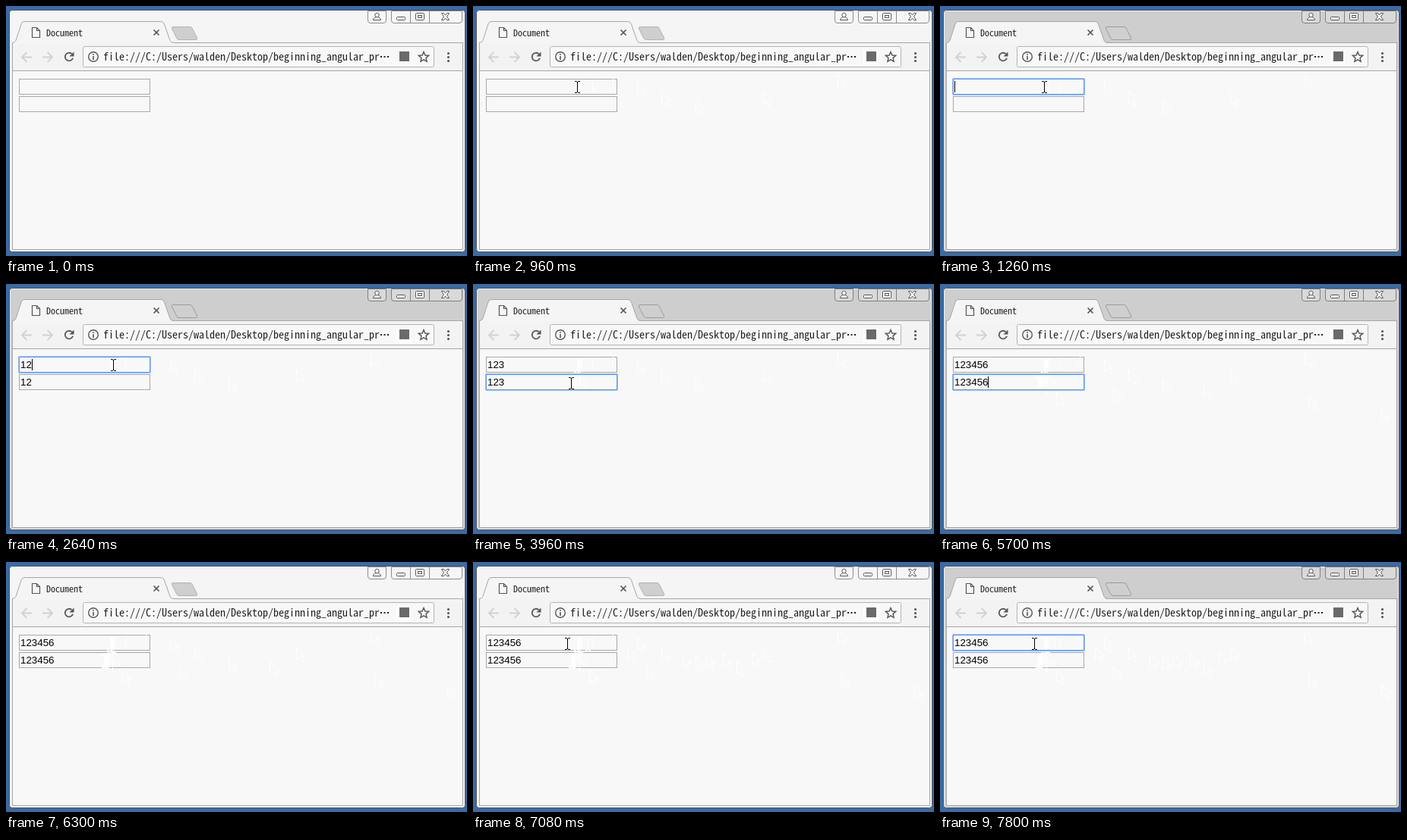
An HTML page for the animation above (8000 ms loop, 607x330 px).

```html
<!DOCTYPE html>
<html lang="en">
<head>
<meta charset="utf-8">
<title>Two-way binding</title>
<style>
  html, body { margin: 0; width: 100%; height: 100%; overflow: hidden; background: #3a6ba4; }
  svg { display: block; }
  .mono {
    font-family: "Noto Sans Mono CJK SC", "Noto Sans Mono CJK JP", "Liberation Mono", monospace;
    font-size-adjust: ch-width .5;
    fill: #222;
  }
  .value { font: 13.333px "Liberation Sans", Arial, sans-serif; fill: #000; }
  .line { fill: none; stroke: #a6a6a6; }
  .icon { fill: none; stroke: #555; }
  .frame { fill: #f5f5f5; stroke: #4b4f55; }
  .button { fill: #f6f6f6; stroke: #8d8d8d; }
  .newtab { fill: #cfcfcf; stroke: #b3b3b3; }
  .active .frame { fill: #cecece; }
  .active .button { fill: #d9d9d9; stroke: #7f7f7f; }
  .active .newtab { stroke: #9c9c9c; }
  .field { fill: #f8f8f8; stroke: #a9a9a9; }
  #focus { fill: none; stroke: #6496ec; }
  #trail { fill: none; stroke: #fff; }
</style>
</head>
<body>
<svg id="stage" width="607" height="330" viewBox="0 0 607 330">
  <defs>
    <path id="arrow" d="M.5.5V17.5L4.5 13.8 7.3 20.2 10 19 7.2 12.8H12.3Z"/>
    <path id="beam" d="M-3 -7.5H-1L.5 -6.5 2 -7.5H4M.5 -7V7M-3 7.5H-1L.5 6.5 2 7.5H4"/>
  </defs>

  <!-- window frame -->
  <rect width="607" height="330" fill="#3a6ba4"/>
  <rect class="frame" x="4.5" y="5.5" width="600" height="319" rx="4"/>
  <rect x="5.5" y="6.5" width="598" height="317" rx="3" fill="none" stroke="#fff" stroke-opacity=".7"/>

  <!-- caption buttons -->
  <path class="button" d="M476.5 6.5V19Q476.5 22.5 480 22.5H497Q500.5 22.5 500.5 19V6.5Z"/>
  <path class="button" d="M507.5 6.5V19Q507.5 22.5 511 22.5H597Q600.5 22.5 600.5 19V6.5ZM532.5 6.5V22.5M557.5 6.5V22.5"/>
  <g fill="#fff" stroke="#555">
    <path d="M483.5 18.5A5 4 0 0 1 493.5 18.5Z"/>
    <circle cx="488.5" cy="12" r="2.7"/>
    <rect x="514.5" y="14.5" width="11" height="4" rx="1"/>
    <rect x="539.5" y="9.5" width="11" height="9" rx="1"/>
    <rect x="542.5" y="12.5" width="5" height="3"/>
    <path d="M573.5 9.5H576.5L578.5 12 580.5 9.5H583.5L580.5 14 583.5 18.5H580.5L578.5 16 576.5 18.5H573.5L576.5 14Z"/>
  </g>

  <!-- tab and toolbar -->
  <rect x="9" y="49" width="592" height="37" fill="#f3f3f3"/>
  <path d="M8 49.5Q12 48.5 13 45.5L20 24Q21 20.5 24 20.5H204Q207 20.5 208.5 24L216 45.5Q217 48.5 221 49.5Z" fill="#f5f5f5"/>
  <path class="line" d="M8.5 48.5Q12 48 13 45.5L20 24Q21 20.5 24 20.5H204Q207 20.5 208.5 24L216 45.5Q217 48.5 221 48.5H601"/>
  <path class="newtab" d="M220 27.5H242Q244.5 27.5 245.5 30L251.5 42Q252.5 44.5 250 44.5H228Q225.5 44.5 224.5 42L218.5 30Q217.5 27.5 220 27.5Z"/>
  <path class="icon" stroke-width="1.2" d="M34.5 28.5H40.5L44.5 32.5V41.5H34.5ZM40.5 28.5V32.5H44.5"/>
  <text class="mono" x="53" y="39.5" font-size="12">Document</text>
  <path class="icon" stroke-width="1.7" d="M194.5 31.5L201.5 38.5M201.5 31.5L194.5 38.5"/>

  <g class="icon" stroke-width="1.8">
    <path stroke="#d2d2d2" d="M34 67.5H21.5M27.5 61L21 67.5 27.5 74M48 67.5H60.5M54.5 61L61 67.5 54.5 74"/>
    <path d="M86.7 63.2A5.3 5.3 0 1 0 88.1 68.8"/>
  </g>
  <path d="M89.5 60.5V66.5H83.5Z" fill="#555"/>

  <rect x="101.5" y="53.5" width="462" height="27" rx="2" fill="#f8f8f8" stroke="#b4b4b4"/>
  <circle class="icon" cx="115" cy="67" r="6.3" stroke-width="1.4"/>
  <path class="icon" stroke-width="1.6" d="M115 66V71M115 63V64.7"/>
  <text class="mono" x="128" y="72" font-size="14">file:///C:/Users/walden/Desktop/beginning_angular_pr</text>
  <path d="M493 66h2v2h-2zM497.5 66h2v2h-2zM502 66h2v2h-2z" fill="#222"/>
  <rect id="hover" x="514" y="58" width="19" height="19" fill="#fff"/>
  <rect x="518" y="60" width="13" height="13" fill="#6a6a6a"/>
  <path class="icon" stroke-width="1.4" d="M550 60.5L551.9 65 556.7 65.4 553 68.6 554.1 73.3 550 70.8 545.9 73.3 547 68.6 543.3 65.4 548.1 65Z"/>
  <path d="M582.5 62.5v0m0 5v0m0 5v0" stroke="#555" stroke-width="3.2" stroke-linecap="round"/>

  <!-- page -->
  <rect x="9" y="86" width="592" height="235" fill="#f8f8f8"/>
  <path class="line" d="M8.5 48V321.5H601.5V48M9 85.5H601"/>
  <rect class="field" x="17.5" y="96.5" width="172" height="20"/>
  <rect class="field" x="17.5" y="119.5" width="172" height="20"/>
  <g id="trail"></g>
  <g id="focus">
    <rect x="16.5" y="95.5" width="174" height="22" rx="1.5" stroke-opacity=".6"/>
    <rect x="17.5" y="96.5" width="172" height="20"/>
  </g>
  <text class="value" x="19" y="111"></text>
  <text class="value" x="19" y="134"></text>
  <rect id="caret" y="99" width="1" height="15"/>
  <use id="pointer"/>
</svg>
<script>
  const LOOP = 8000, TICK = 60, BLINK = 520, DIGIT = 7.415, ROW = 23;
  const $ = id => document.getElementById(id);
  const stage = $("stage"), pointer = $("pointer");
  const values = document.querySelectorAll(".value");

  const keys = [2180, 2600, 2780, 4100, 4280, 4640];
  const clicks = [
    { t: 0, field: -1 }, { t: 1220, field: 0 }, { t: 3440, field: 1 },
    { t: 6260, field: -1 }, { t: 7280, field: 0 }
  ];

  // Pointer visits as key points: time, x, y.
  const visits = [
    [[180, 594, 33], [300, 480, 90], [420, 293, 124], [540, 216, 99], [720, 143, 107],
     [960, 137, 107], [2400, 141, 107], [2820, 141, 107], [2940, 140, 118], [3300, 129, 130],
     [4320, 129, 132], [4680, 134, 133], [4800, 153, 142], [4920, 347, 131], [5040, 581, 162], [5160, 603, 153]],
    [[6660, 574, 51], [6720, 367, 118], [6900, 276, 121], [6960, 204, 112], [7080, 124, 108], [LOOP, 124, 108]]
  ];

  const last = (list, t) => list.filter(e => e.t <= t).pop();
  const show = (el, on) => el.setAttribute("visibility", on ? "visible" : "hidden");

  // Cubic Hermite through b and c, with level ends where the pointer rests.
  function glide(a, b, c, d, t, axis) {
    const slope = (p, q, r) => {
      const before = (q[axis] - p[axis]) / (q[0] - p[0] || 1);
      const after = (r[axis] - q[axis]) / (r[0] - q[0] || 1);
      return before * after > 0 ? 2 * before * after / (before + after) : 0;
    };
    const span = c[0] - b[0], u = (t - b[0]) / span, v = 1 - u;
    return v * v * (1 + 2 * u) * b[axis] + u * u * (1 + 2 * v) * c[axis]
      + span * u * v * (v * slope(a, b, c) - u * slope(b, c, d));
  }

  function locate(t) {
    const visit = visits.find(v => t >= v[0][0] && t < v.at(-1)[0] + TICK);
    if (!visit) return null;
    const end = visit.length - 1;
    const i = Math.min(visit.findLastIndex(p => p[0] <= t), end - 1);
    const around = [visit[Math.max(i - 1, 0)], visit[i], visit[i + 1], visit[Math.min(i + 2, end)]];
    const [x, y] = [1, 2].map(axis => Math.round(glide(...around, t, axis)));
    const overField = x > 17 && x < 190 && y > 96 && y < 140 && y !== 118;
    return { x, y, shape: overField ? "beam" : "arrow" };
  }

  function place(el, { shape, x, y }) {
    el.setAttribute("href", "#" + shape);
    el.setAttribute("transform", `translate(${x} ${y})`);
  }

  // Faint outlines stay on the page where the pointer has been.
  const ghosts = [];
  for (let t = 0; t < LOOP; t += TICK) {
    const p = locate(t), next = locate(t + TICK);
    if (!p || p.y < 86 || p.x > 590 || next && next.x === p.x && next.y === p.y) continue;
    const el = document.createElementNS("http://www.w3.org/2000/svg", "use");
    place(el, p);
    $("trail").append(el);
    ghosts.push({ el, t: t + TICK });
  }

  function draw(t) {
    const { field } = last(clicks, t), active = field >= 0;
    const count = keys.filter(k => k <= t).length;
    const shift = ROW * Math.max(field, 0);
    stage.classList.toggle("active", active);
    show($("focus"), active);
    $("focus").setAttribute("transform", `translate(0 ${shift})`);

    values.forEach(v => v.textContent = "123456".slice(0, count));
    const touched = Math.max(last(clicks, t).t, ...keys.slice(0, count));
    show($("caret"), active && Math.floor((t - touched) / BLINK) % 2 === 0);
    $("caret").setAttribute("x", Math.round(19 + count * DIGIT));
    $("caret").setAttribute("y", 99 + shift);

    const now = locate(t);
    show(pointer, now);
    if (now) {
      place(pointer, now);
      pointer.setAttribute("fill", now.shape === "arrow" ? "#fff" : "none");
      pointer.setAttribute("stroke", "#000");
    }
    ghosts.forEach(g => show(g.el, t >= g.t));
    show($("hover"), t >= 240);
  }

  function frame() {
    const t = performance.now() % LOOP;
    draw(t - t % TICK);
    requestAnimationFrame(frame);
  }
  frame();
</script>
</body>
</html>
```
